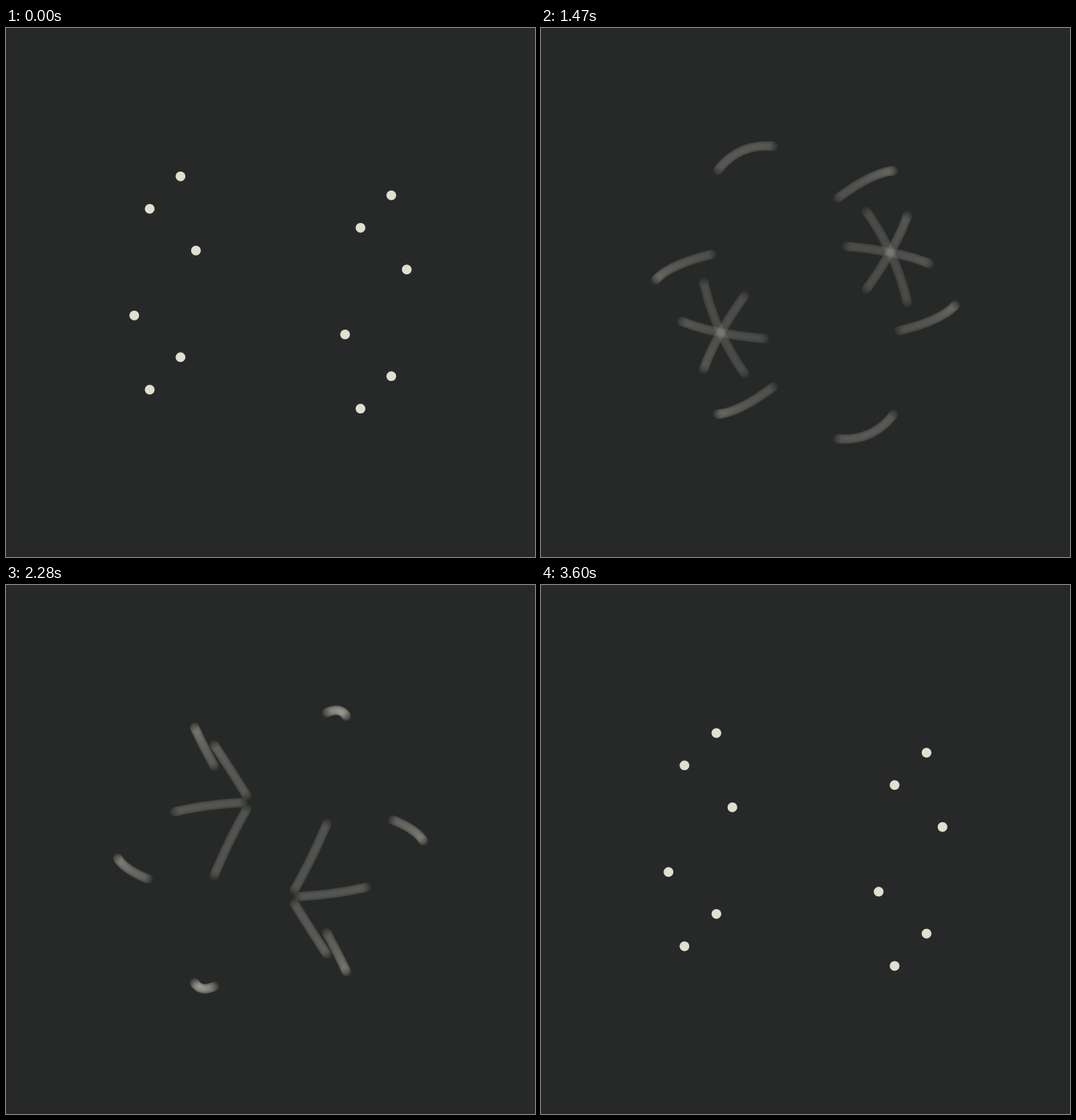
Write an HTML page with a canvas that moves like this. It is 700 px wide and 700 px high and loops after 3630 ms.

```html
<!DOCTYPE html>
<html lang="en">
<head>
<meta charset="utf-8">
<title>Twelve dots on a sphere</title>
<style>
html, body { margin: 0; width: 100%; height: 100%; overflow: hidden; background: #272928; }
canvas { display: block; width: 700px; height: 700px; }
</style>
</head>
<body>
<canvas id="stage" width="700" height="700"></canvas>
<script>
const LOOP = 3630, STEP = 30;
const RADIUS = 205.5, TILT = 0.308, UP = 0.951, DOT = 6.3;
const SHUTTER = 0.6, SAMPLES = 80, GAMMA = 0.7;
const BACK = [39, 41, 40], FORE = [224, 224, 207];
const BOX = 440, ORIGIN = 130, MID = BOX / 2;
const RAD = Math.PI / 180;

// step, angle travelled along the great circles, degrees per step
const SPIN = [
  [0, 0, 0],
  [49, 1036, 63.4],
  [65, 2302.5, 102],
  [88, 3490, 27.2],
  [120, 3780, 0]
];

const ctx = document.getElementById('stage').getContext('2d');
const image = ctx.createImageData(BOX, BOX);
const light = new Float32Array(BOX * BOX);

function spin(n) {
  n = Math.max(0, Math.min(120, n));
  let i = 0;
  while (i < SPIN.length - 2 && n > SPIN[i + 1][0]) i++;
  const [n0, a, va] = SPIN[i], [n1, b, vb] = SPIN[i + 1];
  const h = n1 - n0, s = (n - n0) / h, r = 1 - s;
  return a * r * r * (1 + 2 * s) + b * s * s * (3 - 2 * s)
    + h * s * r * (va * r - vb * s);
}

function stamp(x, y, amount) {
  const reach = DOT + 1;
  for (let py = Math.floor(y - reach); py <= y + reach; py++) {
    for (let px = Math.floor(x - reach); px <= x + reach; px++) {
      const cover = DOT + 0.5 - Math.hypot(px + 0.5 - x, py + 0.5 - y);
      if (cover > 0) light[py * BOX + px] += amount * Math.min(1, cover);
    }
  }
}

function expose(n) {
  const turn = (1.495 * n - 16.3) * RAD;
  const c = Math.cos(turn), s = Math.sin(turn);
  const pole = [-c, TILT * s], side = [-s, -TILT * c];
  light.fill(0);
  for (let i = 0; i < SAMPLES; i++) {
    const angle = 45 + spin(n + SHUTTER * ((i + 0.5) / SAMPLES - 0.5));
    for (let ring = -60; ring <= 60; ring += 60) {
      const cr = Math.cos(ring * RAD), sr = Math.sin(ring * RAD);
      const mx = cr * side[0], my = cr * side[1] - sr * UP;
      for (let q = 0; q < 4; q++) {
        const a = (angle + 90 * q) * RAD, ca = Math.cos(a), sa = Math.sin(a);
        stamp(MID + RADIUS * (ca * pole[0] + sa * mx),
              MID + RADIUS * (ca * pole[1] + sa * my), 1 / SAMPLES);
      }
    }
  }
}

function draw(n) {
  expose(n);
  const data = image.data;
  for (let i = 0, p = 0; i < light.length; i++, p += 4) {
    const k = light[i] ? Math.min(1, Math.pow(light[i], GAMMA)) : 0;
    for (let j = 0; j < 3; j++) data[p + j] = BACK[j] + (FORE[j] - BACK[j]) * k;
    data[p + 3] = 255;
  }
  ctx.putImageData(image, ORIGIN, ORIGIN);
}

const start = performance.now();
let shown = -1;
function tick() {
  const n = Math.floor(((performance.now() - start) % LOOP) / STEP);
  if (n !== shown) draw(shown = n);
  requestAnimationFrame(tick);
}
tick();
</script>
</body>
</html>
```
